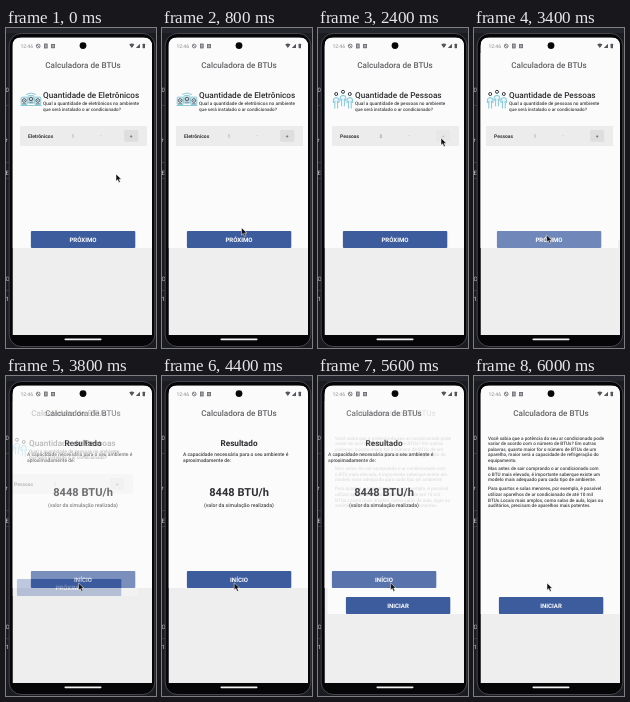
An HTML page that plays this animation: 150 by 320 pixels, repeating every 6.4 s.

```html
<!DOCTYPE html>
<html lang="pt">
<head>
<meta charset="utf-8">
<title>Calculadora de BTUs</title>
<style>
html, body { margin: 0; width: 100%; height: 100%; overflow: hidden; background: #1b1c22; }
svg { display: block; width: 100vw; height: 100vh; }
text { font-family: Roboto, "Noto Sans", sans-serif; white-space: pre; text-rendering: geometricPrecision; }
</style>
</head>
<body>
<svg id="stage" viewBox="0 0 150 320"></svg>
<script>
const LOOP = 6400, STEP = 200;
const BLUE = '#3d5c9e', PRESSED = '#6f88b9', PAGE = '#fbfbfb', ROW = '#ececec';
const LEFT = 6.5, WIDTH = 139.5, TOP = 9.5, NAV = 307;

const text = (x, y, size, str, fill = '#404044', weight = 500, anchor = 'start', id = '') =>
  `<text ${id && `id="${id}"`} x="${x}" y="${y}" font-size="${size}" fill="${fill}" font-weight="${weight}" text-anchor="${anchor}">${str}</text>`;
const centered = (y, size, str, fill, weight) => text(77, y, size, str, fill, weight, 'middle');
const rect = (x, y, w, h, fill, more = '') =>
  `<rect x="${x}" y="${y}" width="${w}" height="${h}" fill="${fill}" ${more}/>`;

function page(id, buttonTop, label, content) {
  return `<g id="${id}">
    ${rect(LEFT, 25, WIDTH, buttonTop - 8, PAGE)}
    ${centered(40, 8.1, 'Calculadora de BTUs', '#626266')}
    ${content}
    ${rect(24.9, buttonTop, 104.4, 17, BLUE, `id="${id}Button" rx="1"`)}
    ${centered(buttonTop + 10.8, 6.1, label, '#fff', 700)}
  </g>`;
}

function quantity(id, noun, icon, value, valueX) {
  return page(id, 203, 'PRÓXIMO', `${icon}
    ${text(37, 70, 8.2, `Quantidade de ${noun}`, '#2c2c30')}
    ${text(37, 77.3, 4.7, `Qual a quantidade de ${noun.toLowerCase()} no ambiente`)}
    ${text(37, 83, 4.6, 'que será instalado o ar condicionado?')}
    ${rect(14, 98, 127, 20, ROW)}
    ${text(22, 109.7, 5, noun, '#38383c', 700)}
    ${text(valueX, 109.7, 5, value, '#88888c', 400, 'middle', id + 'Value')}
    ${text(valueX + 28, 109.3, 5, '-', '#b0b0b0', 400, 'middle')}
    <g id="${id}Plus">
      ${rect(118.2, 102, 14, 11.8, '#dededf', 'rx="1"')}
      ${text(125.2, 109.7, 5, '+', '#55555a', 500, 'middle')}
    </g>`);
}

const devices = [[18.2, 72.5], [25, 71], [31.8, 72.5]].map(([x, y]) => `
  <rect x="${x - 3}" y="${y - 3.4}" width="6" height="7.6" rx="1" fill="#e6f4f7" stroke="#5db6ca" stroke-width=".7"/>
  <circle cx="${x}" cy="${y}" r="1.8" fill="#fff" stroke="#34444c" stroke-width=".9"/>
  <circle cx="${x}" cy="${y}" r=".6" fill="#34444c"/>
  <path d="M${x - 2} ${y + 3.2}h4" stroke="#34444c" stroke-width=".6"/>`).join('') +
  '<path d="M20 66.5q5-3 10 0M14.5 77.5h21" fill="none" stroke="#5db6ca" stroke-width=".7"/>';

const people = [[18.2, 66], [25, 63.8], [31.8, 66]].map(([x, y]) => `
  <path d="M${x - 2.8} ${y + 9}v-3q0-2.4 2.8-2.4t2.8 2.4v3M${x - 1.4} ${y + 7}v7.5M${x + 1.4} ${y + 7}v7.5"
    fill="#e6f4f8" stroke="#62bad2" stroke-width=".8"/>
  <circle cx="${x}" cy="${y}" r="1.5" fill="#fff" stroke="#30383e" stroke-width="1"/>`).join('');

const result = `
  ${centered(70, 8.2, 'Resultado', '#2c2c30', 700)}
  ${text(21, 79.5, 4.95, 'A capacidade necessária para o seu ambiente é')}
  ${text(21, 86, 4.95, 'aproximadamente de:')}
  ${centered(119.5, 11.1, '8448 BTU/h', '#303034', 700)}
  ${centered(130.5, 5.2, '(valor da simulação realizada)', '#4a4a4e')}`;

const paragraphs = [
  [63.6, ['Você sabia que a potência do seu ar condicionado pode',
    'variar de acordo com o número de BTUs? Em outras',
    'palavras, quanto maior for o número de BTUs de um',
    'aparelho, maior será a capacidade de refrigeração do',
    'equipamento.']],
  [94, ['Mas antes de sair comprando o ar condicionado com',
    'o BTU mais elevado, é importante saberque existe um',
    'modelo mais adequado para cada tipo de ambiente.']],
  [114.3, ['Para quartos e salas menores, por exemplo, é possível',
    'utilizar aparelhos de ar condicionado de até 10 mil',
    'BTUs.Locais mais amplos, como salas de aula, lojas ou',
    'auditórios, precisam de aparelhos mais potentes.']]
].map(([y, lines]) => lines.map((s, i) => text(14, y + i * 5.6, 4.68, s)).join('')).join('');

const backdrop = rect(0, 0, 150, 320, '#1b1c22') + rect(0, 0, 150, 5, '#24252d') +
  [[64, '0'], [114, 'r'], [147, 'E'], [253, 'O'], [273, '1']]
    .map(([y, s]) => text(-.5, y, 6, s, '#d0d0d4', 400)).join('') +
  [77, 134, 150, 262].map(y => rect(0, y, 3, .7, '#454750')).join('');

const statusBar = `
  ${text(14.5, 20, 5, '12:46', '#8a8a8e', 400)}
  <g fill="#a8a8ac" stroke="#66666a" stroke-width=".8">
    <circle cx="32.2" cy="18" r="1.9" fill="none"/><path d="M31 16.8l2.4 2.4"/>
    <rect x="38.4" y="16" width="2.8" height="4"/><rect x="45.4" y="16.4" width="3.2" height="3.4"/>
  </g>
  <path d="M123.2 16.5q2.6-1.8 5.2 0l-2.6 3.5zM134 15.7v4.3h-4.2z" fill="#55555a"/>
  ${rect(136.6, 15.8, 2.4, 4.4, '#55555a', 'rx=".4"')}
  <circle cx="77" cy="17.6" r="3.4" fill="#08080a"/>`;

document.getElementById('stage').innerHTML = `
  <defs><clipPath id="screen">
    <path d="M${LEFT} ${NAV}V${TOP + 9}q0-9 9-9h${WIDTH - 18}q9 0 9 9V${NAV}z"/>
  </clipPath></defs>
  ${backdrop}
  ${rect(3.2, 5.5, 145.6, 313, '#060608', 'rx="12" stroke="#55565c" stroke-width=".8"')}
  <g clip-path="url(#screen)">
    ${rect(LEFT, TOP, WIDTH, NAV - TOP, '#eeeeee')}
    ${rect(LEFT, TOP, WIDTH, 25 - TOP, PAGE)}
    ${page('home', 221, 'INICIAR', paragraphs)}
    ${page('result', 195, 'INÍCIO', result)}
    ${quantity('people', 'Pessoas', people, '0', 63)}
    ${quantity('devices', 'Eletrônicos', devices, '1', 67)}
    ${statusBar}
  </g>
  ${rect(58.5, 310.5, 37, 1.7, '#f2f2f2', 'rx=".8"')}
  <path id="cursor" d="M0 0v7.2l1.7-1.5 1.2 2.8 1.4-.6-1.2-2.7h2.3z" fill="#101012" stroke="#fff" stroke-width=".5"/>`;

const $ = id => document.getElementById(id);

// Piecewise linear value from [time, value] pairs
function track(keys, t) {
  if (t <= keys[0][0]) return keys[0][1];
  for (let i = 1; i < keys.length; i++) {
    const [a, u] = keys[i - 1], [b, v] = keys[i];
    if (t < b) return u + (v - u) * (t - a) / (b - a);
  }
  return keys[keys.length - 1][1];
}

const leaveX = [[-200, 0], [0, -2], [200, -11], [400, -14]];
const leaveAlpha = [[0, 1], [200, .85], [400, .32], [600, 0]];
const enterX = [[0, 9], [200, 3], [400, 0]];

const order = ['devices', 'people', 'result', 'home'];
const leaves = [1000, 3400, 5400];
const presses = [1000, 3400, 5200];

// Pointer legs: start, end, from, to
const legs = [
  [0, 1000, [110, 146], [76, 206]],
  [1400, 2400, [76, 206], [123, 110]],
  [2600, 3200, [123, 110], [72.6, 207]],
  [4200, 4400, [72.6, 207], [72.2, 206.8]],
  [5200, 6000, [72.2, 206.8], [73, 207]]
];

function pointer(t) {
  const [a, b, from, to] = legs.filter(l => t >= l[0]).pop();
  const p = Math.min(1, (t - a) / (b - a)), e = p * p * (3 - 2 * p);
  return from.map((v, i) => v + (to[i] - v) * e);
}

function draw(t) {
  order.forEach((id, i) => {
    const since = t - (leaves[i] ?? Infinity);
    const entry = i ? leaves[i - 1] : -Infinity;
    const x = since >= 0 ? track(leaveX, since) : i ? track(enterX, t - entry) : 0;
    const alpha = track(leaveAlpha, since);
    const el = $(id);
    el.setAttribute('transform', `translate(${x} 0)`);
    el.setAttribute('opacity', alpha);
    el.setAttribute('display', t >= entry && alpha > 0 ? 'inline' : 'none');
    const held = t >= presses[i] && t < presses[i] + STEP;
    $(id + 'Button').setAttribute('fill', held ? PRESSED : BLUE);
  });
  $('peopleValue').textContent = t < 2600 ? '0' : '1';
  $('peoplePlus').setAttribute('opacity', t === 2400 ? .3 : 1);
  $('cursor').setAttribute('transform', `translate(${pointer(t)})`);
}

const began = performance.now();
function tick() {
  const t = (performance.now() - began) % LOOP;
  draw(Math.floor(t / STEP) * STEP);
  requestAnimationFrame(tick);
}
tick();
</script>
</body>
</html>
```
